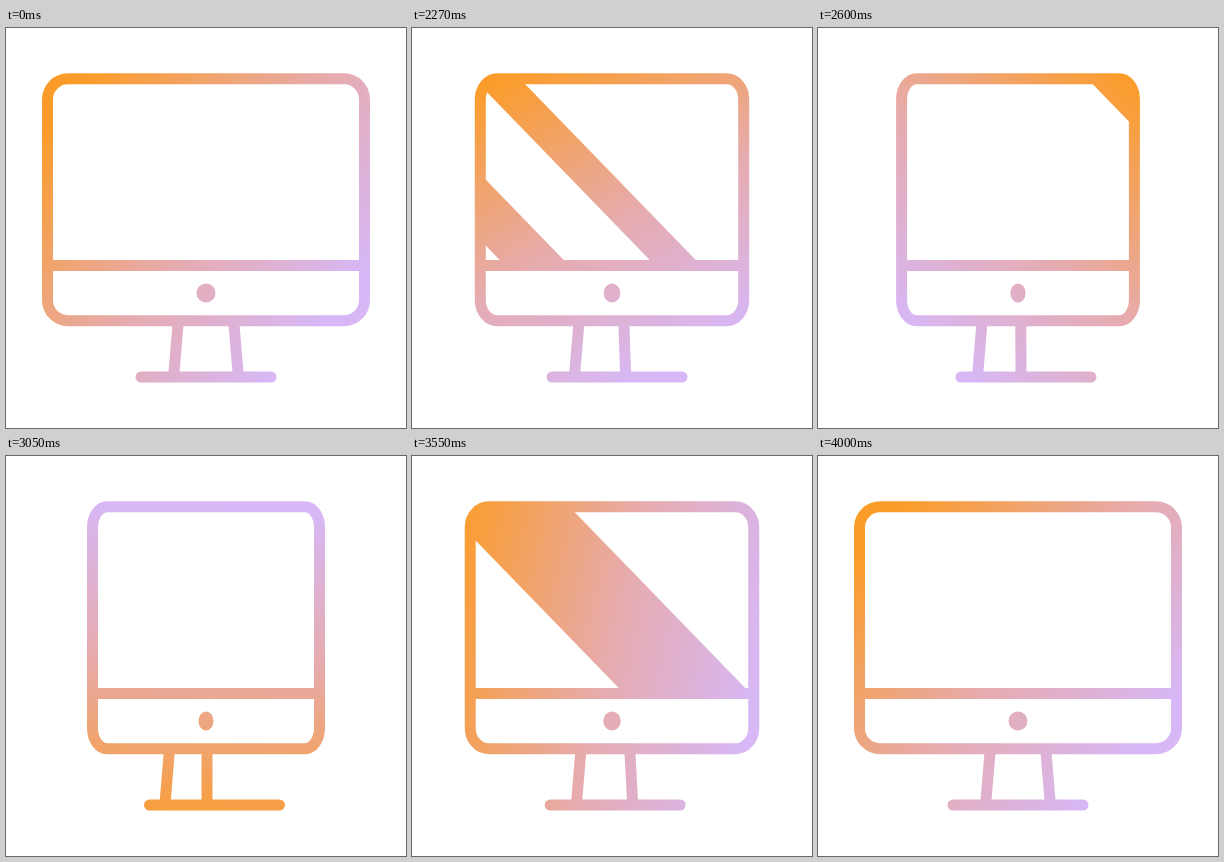
Write an HTML page that moves like this. It is 400 px wide and 400 px high and loops after 4020 ms.

```html
<!DOCTYPE html>
<html lang="en">
<head>
<meta charset="utf-8">
<title>Turning monitor</title>
<style>
  html, body { margin: 0; width: 100%; height: 100%; overflow: hidden; background: #fff; }
  svg { display: block; width: 100%; height: 100%; }
  .line { fill: none; stroke: url(#tint); stroke-width: 11; }
  .fill { fill: url(#tint); }
</style>
</head>
<body>
<svg viewBox="0 0 400 400">
  <defs>
    <linearGradient id="tint" gradientUnits="userSpaceOnUse" x1="15" y1="200" x2="347" y2="200">
      <stop offset="0" stop-color="#fb9c2a"/>
      <stop offset=".55" stop-color="#e6abae"/>
      <stop offset="1" stop-color="#d7b7f5"/>
    </linearGradient>
    <clipPath id="inside"><path id="mask"/></clipPath>
  </defs>
  <path id="shine" class="fill" clip-path="url(#inside)"/>
  <path id="body" class="line"/>
  <path id="bar" class="line"/>
  <path id="legs" class="line"/>
  <path id="base" class="line" stroke-linecap="round"/>
  <ellipse id="dot" class="fill" cx="200" cy="265" ry="9.5"/>
</svg>
<script>
const LOOP = 4020, REST = 2020, TURN = 960, BACK = 1000, SPIN = 2000;
const $ = id => document.getElementById(id);
const mix = (a, b, p) => a + (b - a) * p;
const clamp = p => Math.min(1, Math.max(0, p));
const cubicOut = p => 1 - (1 - p) ** 3;
const cubicInOut = p => p < .5 ? 4 * p ** 3 : 1 - 4 * (1 - p) ** 3;

function bezier(x1, y1, x2, y2) {
  const at = (a, b, q) => 3 * (1 - q) ** 2 * q * a + 3 * (1 - q) * q * q * b + q ** 3;
  return p => {
    let lo = 0, hi = 1;
    for (let i = 0; i < 24; i++) {
      const q = (lo + hi) / 2;
      if (at(x1, x2, q) < p) lo = q; else hi = q;
    }
    return at(y1, y2, lo);
  };
}
const spinEase = bezier(.4, .1, .45, .98);

// The motion advances in 25 ms poses, held for 30 and 20 ms in turn.
function poseTime(ms) {
  const u = ms - REST;
  if (u < 0) return 0;
  return Math.floor(u / 50) * 50 + (u % 50 >= 30 ? 25 : 0);
}

function bodyPath(half) {
  const l = 200 - half, r = 200 + half, top = 50.8, low = 292.7;
  const ry = 20.5, rx = ry * half / 158.5;
  const arc = (x, y) => `A${rx} ${ry} 0 0 1 ${x} ${y}`;
  return `M${l + rx} ${top}H${r - rx}${arc(r, top + ry)}V${low - ry}${arc(r - rx, low)}` +
    `H${l + rx}${arc(l, low - ry)}V${top + ry}${arc(l + rx, top)}Z`;
}

// A slanted band; a and b are its edges along y = 57.
function band(a, b) {
  const x = (edge, y) => edge + (y - 57) * .97;
  return `M${x(a, 48)} 48H${x(b, 48)}L${x(b, 238)} 238H${x(a, 238)}Z`;
}

function draw(ms) {
  const u = poseTime(ms);
  const turn = u < BACK
    ? cubicOut(clamp(u / TURN))
    : 1 - cubicInOut(clamp((u - BACK - 0) / TURN));
  const half = mix(158.5, 113.5, turn);
  const outline = bodyPath(half);

  $('body').setAttribute('d', outline);
  $('mask').setAttribute('d', outline);
  $('bar').setAttribute('d', `M${200 - half} 237.5H${200 + half}`);
  $('dot').setAttribute('rx', mix(9.5, 7.5, turn));

  const leg = (top, foot) => `M${top} 293L${foot} 349`;
  $('legs').setAttribute('d',
    leg(mix(172.3, 163.5, turn), mix(167.6, 158.9, turn)) +
    leg(mix(227.7, 201, turn), mix(232.4, 201, turn)));
  const shift = mix(0, 8.5, turn);
  $('base').setAttribute('d', `M${135 + shift} 349H${265 + shift}`);

  const a = 83 + 1.1 * (u - 400), v = u - 1400;
  $('shine').setAttribute('d',
    band(a, a + 64) + band(a + 150, a + 196) + band(v - 88, 48 + .924 * v));

  const angle = 40 + 360 * spinEase(u / SPIN);
  $('tint').setAttribute('gradientTransform', `rotate(${angle} 200 200)`);
}

const start = performance.now();
function tick() {
  draw((performance.now() - start) % LOOP);
  requestAnimationFrame(tick);
}
tick();
</script>
</body>
</html>
```
